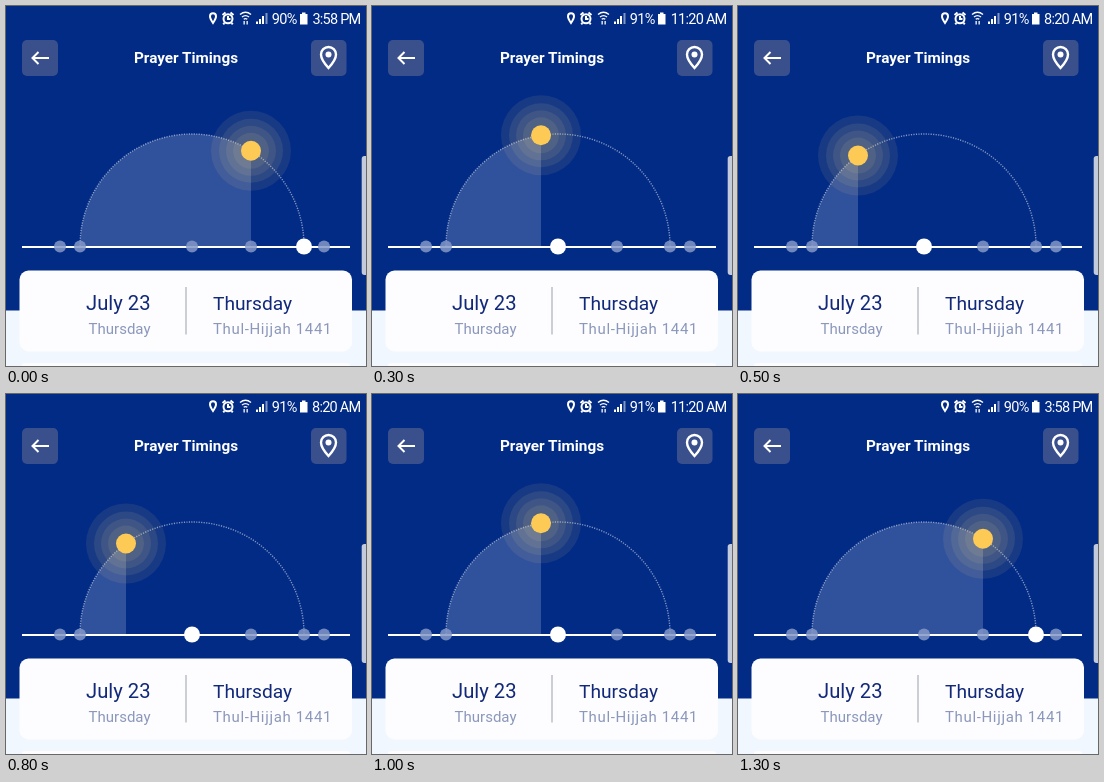
Write an HTML page that moves like this. It is 360 px wide and 360 px high and loops after 1.4 s.

```html
<!DOCTYPE html>
<html lang="en">
<head>
<meta charset="utf-8">
<title>Prayer Timings</title>
<style>
  html, body { margin: 0; width: 100%; height: 100%; overflow: hidden; background: #022b85; }
  svg { display: block; width: 100%; height: 100%; font-family: Roboto, sans-serif; }
  .status { font-size: 14.5px; letter-spacing: -.75px; fill: #fff; }
  .line { fill: none; stroke: #fff; }
  .title { font-size: 15.3px; font-weight: 700; fill: #fff; }
  .day { fill: #12297a; }
  .note { font-size: 15px; fill: #8b98bb; }
  .dot { fill: #8498c8; opacity: .85; }
  .dot.next { fill: #fff; opacity: 1; }
  .halo { fill: #ffdc85; opacity: .085; }
</style>
</head>
<body>
<svg viewBox="0 0 360 360">
  <rect width="360" height="360" fill="#022b85"/>
  <rect y="304.500" width="360" height="55.500" fill="#f1f7fe"/>

  <g class="status">
    <g id="icons">
      <path class="line" stroke-width="2" d="M207 17C204.800 13.800 204 12 204 10.300a3 3 0 0 1 6 0C210 12 209.200 13.800 207 17Z"/>
      <g class="line" stroke-width="2">
        <circle cx="222" cy="12.800" r="4.500"/>
        <path d="M222 10v3h2.500M216.500 9l3-2.500M227.500 9l-3-2.500M218.500 17l-1.300 1.300M225.500 17l1.300 1.300"/>
      </g>
      <g class="line" stroke-width="1.400">
        <path d="M234 8.500q5.500-4.500 11 0M236 11q3.500-2.800 7 0M237.700 13.300q1.800-1.400 3.600 0"/>
      </g>
      <path d="M237.500 15h1.300v3.500h-1.300zM240.500 15h1.300v3.500h-1.300z"/>
      <path d="M250 15.500h2v2.500h-2zM253 13h2v5h-2zM256 10h2v8h-2z"/>
      <path d="M259.500 7h2v11h-2z" opacity=".5"/>
      <text id="charge" x="290.500" y="17.500" text-anchor="end"></text>
      <path d="M296 6.500h3.500v1.500h2v10.500h-7.500V8h2z"/>
    </g>
    <text id="clock" x="354.500" y="17.500" text-anchor="end"></text>
  </g>

  <g fill="#3a508d">
    <rect x="16" y="34" width="36" height="36" rx="5"/>
    <rect x="305" y="34" width="35.500" height="36" rx="5"/>
  </g>
  <path class="line" stroke-width="2" d="M43 52H26.500M32.500 46l-6 6 6 6"/>
  <path class="line" stroke-width="2.400" d="M322.500 62C317.500 56.500 315 52.500 315 48.500a7.500 7.500 0 0 1 15 0C330 52.500 327.500 56.500 322.500 62Z"/>
  <circle cx="322.500" cy="48.500" r="3" fill="#fff"/>
  <text class="title" x="180" y="57" text-anchor="middle">Prayer Timings</text>

  <path id="elapsed" fill="#fff" fill-opacity=".18"/>
  <path d="M74 240A112 112 0 0 1 298 240" class="line" stroke-width="1.400" stroke-dasharray="1.200 1.300" opacity=".5"/>
  <path d="M16 241H344" class="line" stroke-width="2"/>
  <g id="dots"></g>
  <g id="sun">
    <circle class="halo" r="40"/>
    <circle class="halo" r="32"/>
    <circle class="halo" r="25"/>
    <circle class="halo" r="18"/>
    <circle r="10" fill="#fdcb55"/>
  </g>

  <rect x="13.500" y="264.500" width="332.500" height="81" rx="9" fill="#fdfdff"/>
  <path d="M16 360v-1q0-2 3-2h322q3 0 3 2v1z" fill="#fdfdff"/>
  <path d="M180 281V328.500" stroke="#c6c9d1" stroke-width="1.800"/>
  <g text-anchor="end">
    <text class="day" x="144.500" y="304" font-size="20.200">July 23</text>
    <text class="note" x="144.500" y="328">Thursday</text>
  </g>
  <text class="day" x="207" y="304" font-size="19.200">Thursday</text>
  <text class="note" x="207" y="328" letter-spacing=".65">Thul-Hijjah 1441</text>
  <path d="M360 150h-1.500q-2.800 0-2.800 3v113q0 3 2.800 3h1.500z" fill="#c3cadb"/>
</svg>
<script>
  const CENTER = 186, BASE = 240, RADIUS = 112, LOOP = 1400;
  const prayers = [54, 74, 186, 245, 298, 318];
  const moments = {
    early:     { x: 88,  clock: '6:30 AM',  charge: 91, next: 186 },
    morning:   { x: 120, clock: '8:20 AM',  charge: 91, next: 186 },
    noon:      { x: 169, clock: '11:20 AM', charge: 91, next: 186 },
    afternoon: { x: 225, clock: '2:45 PM',  charge: 90, next: 245 },
    late:      { x: 245, clock: '3:58 PM',  charge: 90, next: 298 }
  };
  const schedule = [
    [0, 'late'], [200, 'afternoon'], [300, 'noon'], [500, 'morning'], [600, 'early'],
    [800, 'morning'], [1000, 'noon'], [1100, 'afternoon'], [1300, 'late']
  ];

  const $ = id => document.getElementById(id);
  const dots = prayers.map(x => {
    const dot = document.createElementNS('http://www.w3.org/2000/svg', 'circle');
    dot.setAttribute('cx', x);
    dot.setAttribute('cy', 240.5);
    $('dots').append(dot);
    return dot;
  });

  function show({ x, clock, charge, next }) {
    const y = BASE - Math.sqrt(RADIUS ** 2 - (x - CENTER) ** 2);
    $('sun').setAttribute('transform', `translate(${x} ${y})`);
    $('elapsed').setAttribute('d',
      `M${CENTER - RADIUS} ${BASE}A${RADIUS} ${RADIUS} 0 0 1 ${x} ${y}V${BASE}Z`);
    $('clock').textContent = clock;
    $('charge').textContent = charge + '%';
    $('icons').setAttribute('transform', `translate(${clock.length > 7 ? -8 : 0} 0)`);
    dots.forEach((dot, i) => {
      const active = prayers[i] === next;
      dot.setAttribute('class', active ? 'dot next' : 'dot');
      dot.setAttribute('r', active ? 8 : 6);
    });
  }

  let start, current;
  function tick(now) {
    start ??= now;
    const time = (now - start) % LOOP;
    const name = schedule.findLast(([from]) => from <= time)[1];
    if (name !== current) show(moments[current = name]);
    requestAnimationFrame(tick);
  }
  show(moments[current = 'late']);
  requestAnimationFrame(tick);
</script>
</body>
</html>
```
